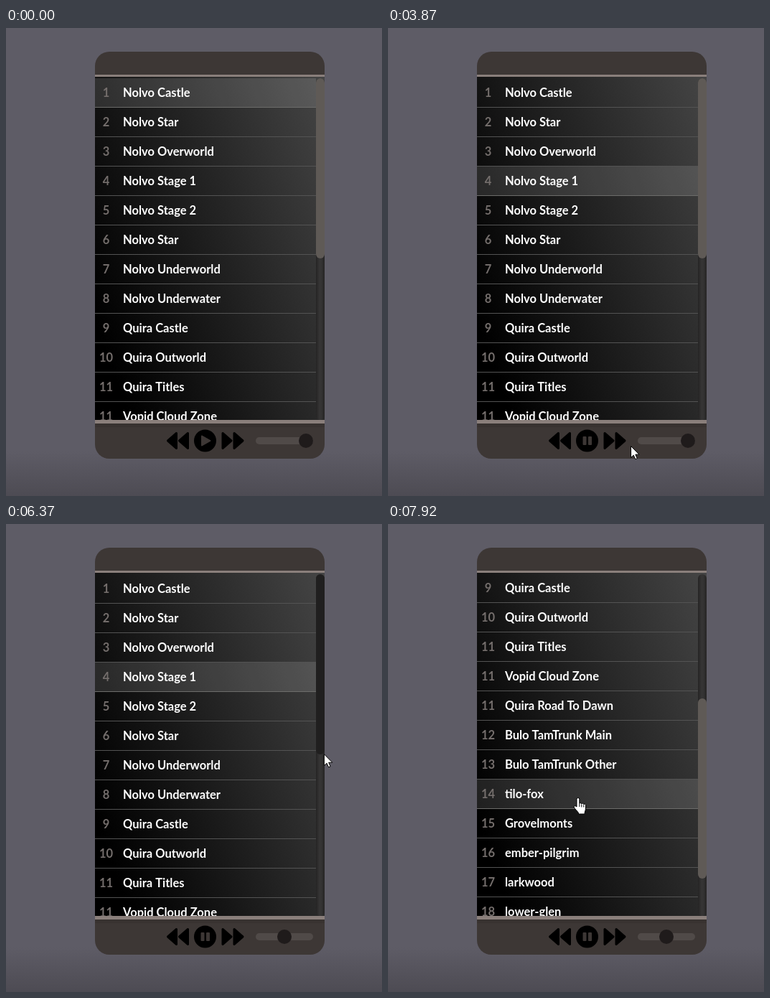
Write an HTML page with a canvas that moves like this. It is 524 px wide and 652 px high and loops after 8 s.

```html
<!DOCTYPE html>
<html lang="en">
<head>
<meta charset="utf-8">
<title>Music player</title>
<style>
html, body { margin: 0; width: 100%; height: 100%; overflow: hidden; background: #5e5c66; }
canvas { display: block; }
</style>
</head>
<body>
<canvas id="stage" width="524" height="652"></canvas>
<script>
const ctx = document.getElementById('stage').getContext('2d');
const LOOP = 8000, ROW = 41, LIST_TOP = 70, LIST_BOTTOM = 546;
const PANEL = '#3d3735', HOVER = '#432b2a';

const tracks = [
  [1, 'Nolvo Castle'], [2, 'Nolvo Star'], [3, 'Nolvo Overworld'], [4, 'Nolvo Stage 1'],
  [5, 'Nolvo Stage 2'], [6, 'Nolvo Star'], [7, 'Nolvo Underworld'], [8, 'Nolvo Underwater'],
  [9, 'Quira Castle'], [10, 'Quira Outworld'], [11, 'Quira Titles'], [11, 'Vopid Cloud Zone'],
  [11, 'Quira Road To Dawn'], [12, 'Bulo TamTrunk Main'], [13, 'Bulo TamTrunk Other'],
  [14, 'tilo-fox'], [15, 'Grovelmonts'], [16, 'ember-pilgrim'], [17, 'larkwood'], [18, 'lower-glen']
];

// Pointer moves: start, end, number of steps, target x, target y
const moves = [
  [70, 520, 7, 275, 584], [770, 770, 1, 275, 583],
  [1300, 1460, 3, 300, 597], [1540, 1710, 3, 323, 587],
  [2550, 2550, 1, 323, 586], [2860, 2860, 1, 323, 585], [3240, 3240, 1, 322, 583],
  [3790, 4340, 8, 428, 580], [4570, 4800, 4, 421, 579], [5120, 5670, 8, 388, 578],
  [5820, 5990, 3, 424, 422], [6060, 6280, 4, 447, 330], [6360, 6520, 3, 433, 294],
  [6770, 6840, 2, 433, 338.5], [6930, 7300, 6, 434, 467],
  [7450, 7530, 2, 405, 459], [7610, 7920, 5, 264, 381]
];
const presses = [[1070, 1150], [2400, 2550], [2860, 3010], [3410, 3650], [4970, 5820], [6770, 7380]];

const hand = new Path2D('M5 13V2.4a1.9 1.9 0 0 1 3.8 0V8.6a1.6 1.6 0 0 1 3 .5a1.6 1.6 0 0 1 3 .7a1.5 1.5 0 0 1 2.7 1V16c0 2-1.4 3.4-1.4 5.4V23H7.5V21.4C6 19 3 16.6 1.4 14c-1-2 1.2-3 2.4-1.8z');
const knuckles = new Path2D('M8.8 9v4M11.8 9.5v4M14.8 10.5v3');
const arrow = new Path2D('M0 0V16L3.7 12.6L6.2 18.2L8.7 17.1L6.3 11.6H11.4Z');
const skip = new Path2D('M2 -10.5L14 0L2 10.5ZM18 -10.5L30 0L18 10.5Z');

function pointerAt(t) {
  let x = 440, y = 655;
  for (const [start, end, steps, tx, ty] of moves) {
    if (t < start) break;
    const k = end > start ? Math.floor((t - start) / (end - start) * (steps - 1) + 1e-6) + 1 : 1;
    const p = Math.min(1, k / steps), e = p * p * (3 - 2 * p);
    x += (tx - x) * e;
    y += (ty - y) * e;
  }
  return { x, y };
}

const inside = (p, x, y, w, h) => p.x >= x && p.x < x + w && p.y >= y && p.y < y + h;

function rect(color, x, y, w, h, r = 0) {
  ctx.fillStyle = color;
  ctx.beginPath();
  ctx.roundRect(x, y, w, h, r);
  ctx.fill();
}

function disc(color, x, y, r) {
  ctx.fillStyle = color;
  ctx.beginPath();
  ctx.arc(x, y, r, 0, 2 * Math.PI);
  ctx.fill();
}

function gradient(x0, y0, x1, y1, ...stops) {
  const g = ctx.createLinearGradient(x0, y0, x1, y1);
  stops.forEach(([at, color]) => g.addColorStop(at, color));
  return g;
}

function drawPanel() {
  rect(gradient(0, 590, 0, 652, [0, '#5e5c66'], [1, '#4d4b53']), 0, 0, 524, 652);
  rect(PANEL, 124, 33, 320, 567, 20);
  rect('#8a7f7b', 124, 65, 320, 3);
  // 70 degree diagonal across the list box
  const angle = 70 * Math.PI / 180, dx = Math.sin(angle), dy = -Math.cos(angle);
  const half = (320 * dx - 478 * dy) / 2;
  rect(gradient(284 - dx * half, 307 - dy * half, 284 + dx * half, 307 + dy * half,
    [0, '#000'], [.1, '#000'], [1, '#454545']), 124, 68, 320, 478);
}

function drawList(scroll, active, hovered) {
  ctx.save();
  ctx.beginPath();
  ctx.rect(124, LIST_TOP, 308, LIST_BOTTOM - LIST_TOP);
  ctx.clip();
  ctx.font = 'bold 16.5px Lato, sans-serif';
  tracks.forEach(([number, title], i) => {
    const y = LIST_TOP + i * ROW - scroll, lit = i === active || i === hovered;
    if (lit) rect('rgba(255,255,255,.12)', 124, y, 308, ROW - 1);
    rect(lit ? '#6c6c6a' : '#535353', 124, y + ROW - 1, 308, 1);
    ctx.textAlign = 'center';
    ctx.fillStyle = '#746e6c';
    ctx.fillText(number, 139.5, y + 26);
    ctx.textAlign = 'left';
    ctx.fillStyle = '#fff';
    ctx.fillText(title, 163, y + 26);
  });
  ctx.restore();
}

function drawScrollbar(shift, dark) {
  const edge = '#252424';
  rect(gradient(432, 0, 444, 0, [0, edge], [.4, '#353434'], [.6, '#353434'], [1, edge]), 432, 70, 12, 476, 6);
  rect(dark ? '#201f1f' : '#5f5a56', 432, 70 + shift, 12, 251, 6);
}

function drawSkip(x, direction, color) {
  ctx.save();
  ctx.translate(x, 575);
  ctx.scale(direction, 1);
  ctx.fillStyle = ctx.strokeStyle = color;
  ctx.lineWidth = 3;
  ctx.lineJoin = 'round';
  ctx.fill(skip);
  ctx.stroke(skip);
  ctx.restore();
}

function drawControls(playing, overPlay, overNext, knob) {
  rect('#8a7f7b', 124, 546, 320, 5);
  rect('#383230', 124, 551, 320, 5);
  drawSkip(255.5, -1, '#000');
  drawSkip(300, 1, overNext ? HOVER : '#000');
  disc(overPlay ? HOVER : '#000', 277.5, 575, 15.5);
  if (playing) {
    rect(PANEL, 271.5, 569, 5, 12, 1);
    rect(PANEL, 279, 569, 5, 12, 1);
  } else {
    ctx.fillStyle = ctx.strokeStyle = PANEL;
    ctx.lineWidth = 2;
    ctx.lineJoin = 'round';
    ctx.beginPath();
    ctx.moveTo(273, 568.5);
    ctx.lineTo(284.5, 575);
    ctx.lineTo(273, 581.5);
    ctx.closePath();
    ctx.fill();
    ctx.stroke();
  }
  rect('#504a48', 348, 570, 80, 10, 5);
  disc('#1f1b1b', knob, 575, 10);
}

function drawPointer({ x, y }, isHand, pressed) {
  if (pressed) disc('rgba(170,167,5,.82)', x + .5, y - 1, 15);
  ctx.save();
  ctx.translate(isHand ? x - 6 : x, y);
  ctx.fillStyle = '#fff';
  ctx.strokeStyle = '#000';
  ctx.lineWidth = 1;
  ctx.lineJoin = 'round';
  const shape = isHand ? hand : arrow;
  ctx.fill(shape);
  ctx.stroke(shape);
  if (isHand) ctx.stroke(knuckles);
  ctx.restore();
}

function draw(t) {
  const p = pointerAt(t);
  const pressed = presses.some(([from, to]) => t >= from && t < to);
  const dragging = t >= 6770 && t < 7380;
  const shift = t < 6770 ? 0 : dragging ? p.y - 294 : 173;
  const scroll = Math.round(shift * 1.9);
  const knob = t < 5120 ? 418 : t < 5820 ? 418 - (421 - p.x) * 30 / 33 : 388;
  const active = [2470, 3010, 3560].filter(time => t >= time).length;

  const overList = inside(p, 124, LIST_TOP, 308, LIST_BOTTOM - LIST_TOP);
  const overPlay = Math.hypot(p.x - 277.5, p.y - 575) < 16;
  const overNext = inside(p, 300, 561, 33, 29);
  const overSlider = inside(p, 346, 564, 84, 22);
  const overThumb = inside(p, 432, 70 + shift, 12, 251);
  const hovered = overList ? Math.floor((p.y - LIST_TOP + scroll) / ROW) : -1;

  drawPanel();
  drawList(scroll, active, hovered);
  drawScrollbar(shift, overThumb || dragging);
  drawControls(t >= 1150, overPlay, overNext, knob);
  if (t >= 70) drawPointer(p, overList || overPlay || overNext || overSlider, pressed);
}

const began = performance.now();
function tick() {
  draw((performance.now() - began) % LOOP);
  requestAnimationFrame(tick);
}
tick();
</script>
</body>
</html>
```
